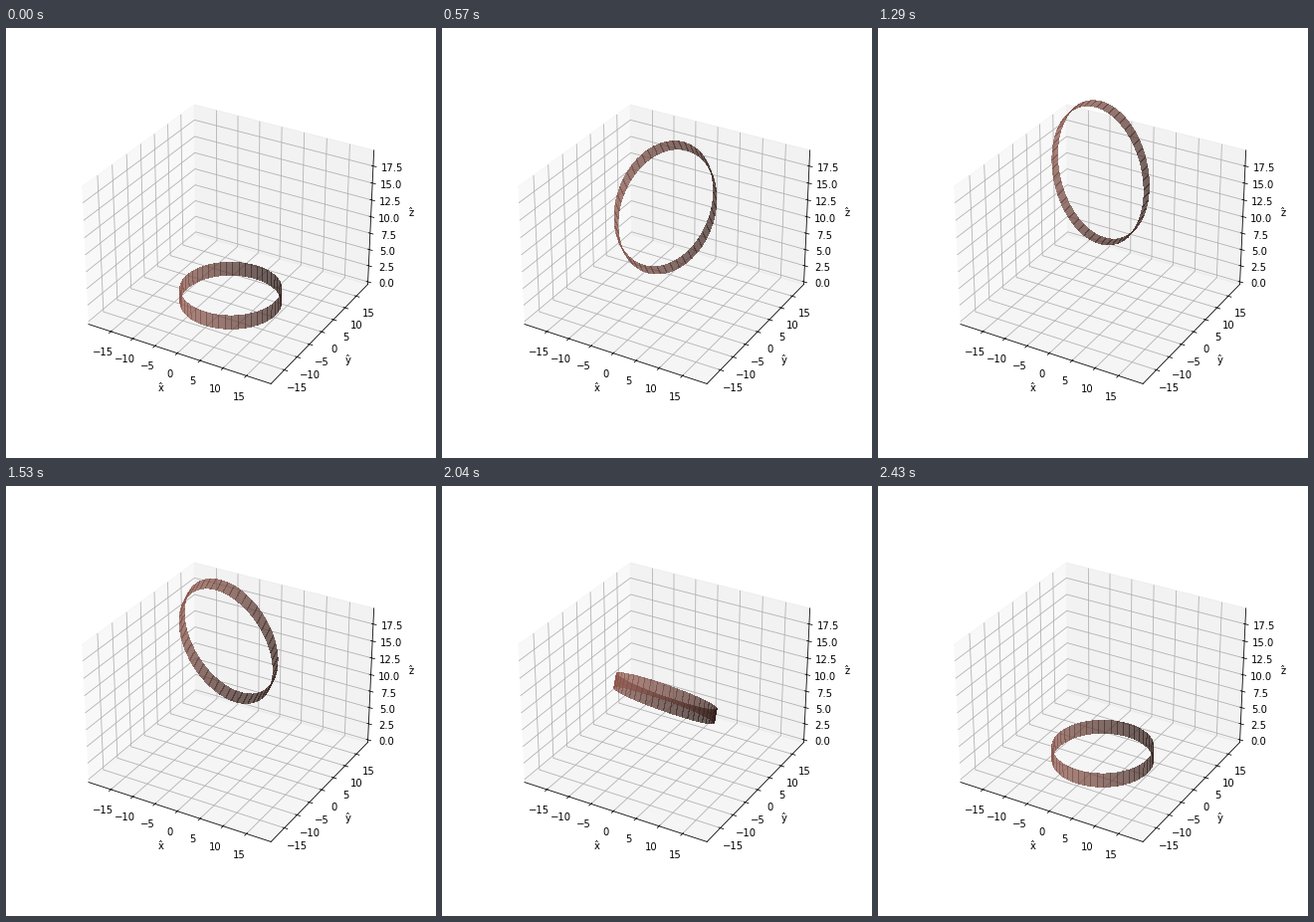
These frames come from a looping animation (432x432 px, 2.97 s). A matplotlib script:

```python
import numpy as np
import matplotlib.pyplot as plt
from matplotlib.animation import FuncAnimation

GRAVITY = 9.81
SPEED = 19.5            # launch speed, gives a flight of about 4 s
SPIN = np.pi / 4        # half a turn during the flight
DT = 0.05
FLIGHT_STEPS = 80
RADIUS, WIDTH = 10, 2
REACH = SPEED**2 / (2 * GRAVITY)
MARGIN = 1 / 48

theta, height = np.meshgrid(np.linspace(0, 2 * np.pi, 50), np.linspace(0, WIDTH, 2))
RING_X = RADIUS * np.cos(theta)
RING_Y = RADIUS * np.sin(theta)

plt.rcParams["font.family"] = "DejaVu Sans"
fig = plt.figure(figsize=(6, 6), dpi=72)
fig.subplots_adjust(left=0.125, right=0.9, bottom=0.125, top=0.88)
ax = fig.add_subplot(projection="3d")

pad = 2 * REACH * MARGIN
ax.set_xlim(-REACH - pad, REACH + pad)
ax.set_ylim(-REACH - pad, REACH + pad)
ax.set_zlim(-pad / 2, REACH + pad / 2)
ax.set_xticks(range(-15, 16, 5))
ax.set_yticks(range(-15, 16, 5))
ax.set_zticks(np.arange(0, 17.6, 2.5))
ax.set_xlabel("x\u0302")
ax.set_ylabel("y\u0302")
ax.set_zlabel("z\u0302")
ax.set_autoscale_on(False)

ring = None


def draw(frame):
    """Show the spinning ring on its way up and down, at rest otherwise."""
    global ring
    step = max(frame - 1, 0)
    if step >= FLIGHT_STEPS:
        step = 0
    t = step * DT
    lift = SPEED * t - GRAVITY * t**2 / 2
    c, s = np.cos(SPIN * t), np.sin(SPIN * t)
    if ring is not None:
        ring.remove()
    ring = ax.plot_surface(
        RING_X,
        RING_Y * c - height * s,
        RING_Y * s + height * c + lift,
        color="tab:brown", alpha=0.7, linewidth=0, antialiased=False,
    )
    return [ring]


anim = FuncAnimation(fig, draw, frames=99, interval=30, init_func=lambda: draw(0),
                     repeat=True, repeat_delay=0, blit=False)
plt.show()
```
